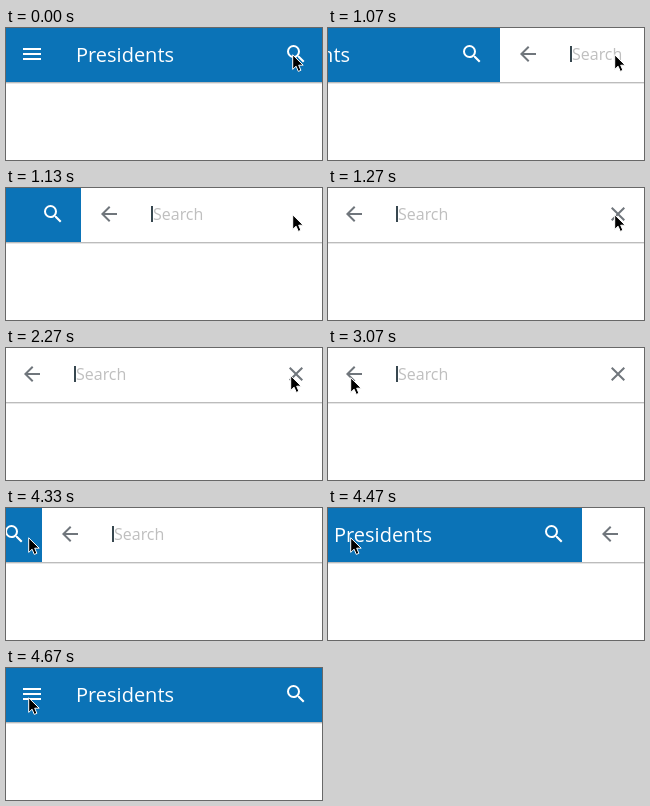
An HTML page that plays this animation: 316x132 px, repeating every 4.99 s.

```html
<!DOCTYPE html>
<html lang="en">
<head>
<meta charset="utf-8">
<title>Sliding search bar</title>
<style>
  html, body { margin: 0; width: 100%; height: 100%; overflow: hidden; background: #fff; }
  .stage { position: relative; width: 316px; height: 132px; overflow: hidden; background: #fff; }

  /* Two 320px bars side by side; the view crops 2px off each end. */
  .strip { position: absolute; left: -2px; top: 0; width: 640px; height: 54px; animation: slide 4990ms step-end infinite; }
  .bar { position: absolute; top: 0; left: 0; width: 320px; height: 54px; font-family: "Open Sans", "Noto Sans", sans-serif; white-space: nowrap; }
  .title { background: #0b73b7; color: #fff; }
  .search { left: 320px; background: #fff; color: #70767c; }
  .shadow { position: absolute; left: 0; top: 54px; width: 316px; height: 2px; background: linear-gradient(#bcbcbc 50%, #e6e6e6 50%); }

  .icon { position: absolute; top: 14px; left: 16px; width: 24px; height: 24px; fill: currentColor; }
  .right { left: 280px; }
  .label { position: absolute; left: 72px; top: 0; line-height: 54px; font-size: 20px; }
  .hint { font-size: 16px; line-height: 53px; color: #bfbfbf; }
  .caret { position: absolute; left: 70px; top: 18px; width: 2px; height: 16px; background: #37474f; }

  .cursor { position: absolute; left: 0; top: 0; width: 14px; height: 20px; overflow: visible; animation: point 4990ms step-end infinite; }

  @keyframes slide {
    0% { transform: translateX(0); }
    21.442% { transform: translateX(-146px); }
    22.645% { transform: translateX(-243px); }
    24.048% { transform: translateX(-303px); }
    25.45% { transform: translateX(-320px); }
    86.773% { transform: translateX(-282px); }
    88.176% { transform: translateX(-143px); }
    89.378% { transform: translateX(-64px); }
    90.781% { transform: translateX(-19px); }
    92.184% { transform: translateX(-3px); }
    93.587%, 100% { transform: translateX(0); }
  }

  @keyframes point {
    0% { transform: translate(286px, 26px); }
    34.669% { transform: translate(285px, 27px); }
    45.49% { transform: translate(284px, 27px); }
    46.693% { transform: translate(275px, 28px); }
    48.096% { transform: translate(253px, 30px); }
    49.498% { transform: translate(220px, 32px); }
    50.701% { transform: translate(180px, 34px); }
    52.104% { transform: translate(140px, 36px); }
    53.507% { transform: translate(106px, 37px); }
    54.709% { transform: translate(80px, 38px); }
    56.112% { transform: translate(59px, 37px); }
    57.515% { transform: translate(43px, 35px); }
    58.717% { transform: translate(32px, 32px); }
    60.12% { transform: translate(25px, 30px); }
    61.523%, 100% { transform: translate(22px, 29px); }
  }
</style>
</head>
<body>
<div class="stage">
  <div class="shadow"></div>
  <div class="strip">
    <div class="bar title">
      <svg class="icon" viewBox="0 0 24 24"><path d="M3 6h18v2H3zM3 11h18v2H3zM3 16h18v2H3z"/></svg>
      <span class="label">Presidents</span>
      <svg class="icon right" viewBox="0 0 24 24"><path d="M15.5 14h-.79l-.28-.27A6.47 6.47 0 0 0 16 9.5 6.5 6.5 0 1 0 9.5 16c1.61 0 3.09-.59 4.23-1.57l.27.28v.79l5 4.99L20.49 19zm-6 0a4.5 4.5 0 1 1 0-9 4.5 4.5 0 0 1 0 9z"/></svg>
    </div>
    <div class="bar search">
      <svg class="icon" viewBox="0 0 24 24"><path d="M20 11H7.83l5.59-5.59L12 4l-8 8 8 8 1.41-1.41L7.83 13H20z"/></svg>
      <span class="label hint">Search</span>
      <span class="caret"></span>
      <svg class="icon right" viewBox="0 0 24 24"><path d="M19 6.41 17.59 5 12 10.59 6.41 5 5 6.41 10.59 12 5 17.59 6.41 19 12 13.41 17.59 19 19 17.59 13.41 12z"/></svg>
    </div>
  </div>
  <svg class="cursor" viewBox="0 0 14 20"><path d="M.7.8V15.4L4.1 12.2 6.3 17.4 8.9 16.3 6.7 11.2H11.2Z" fill="#000" stroke="#fff"/></svg>
</div>
</body>
</html>
```
